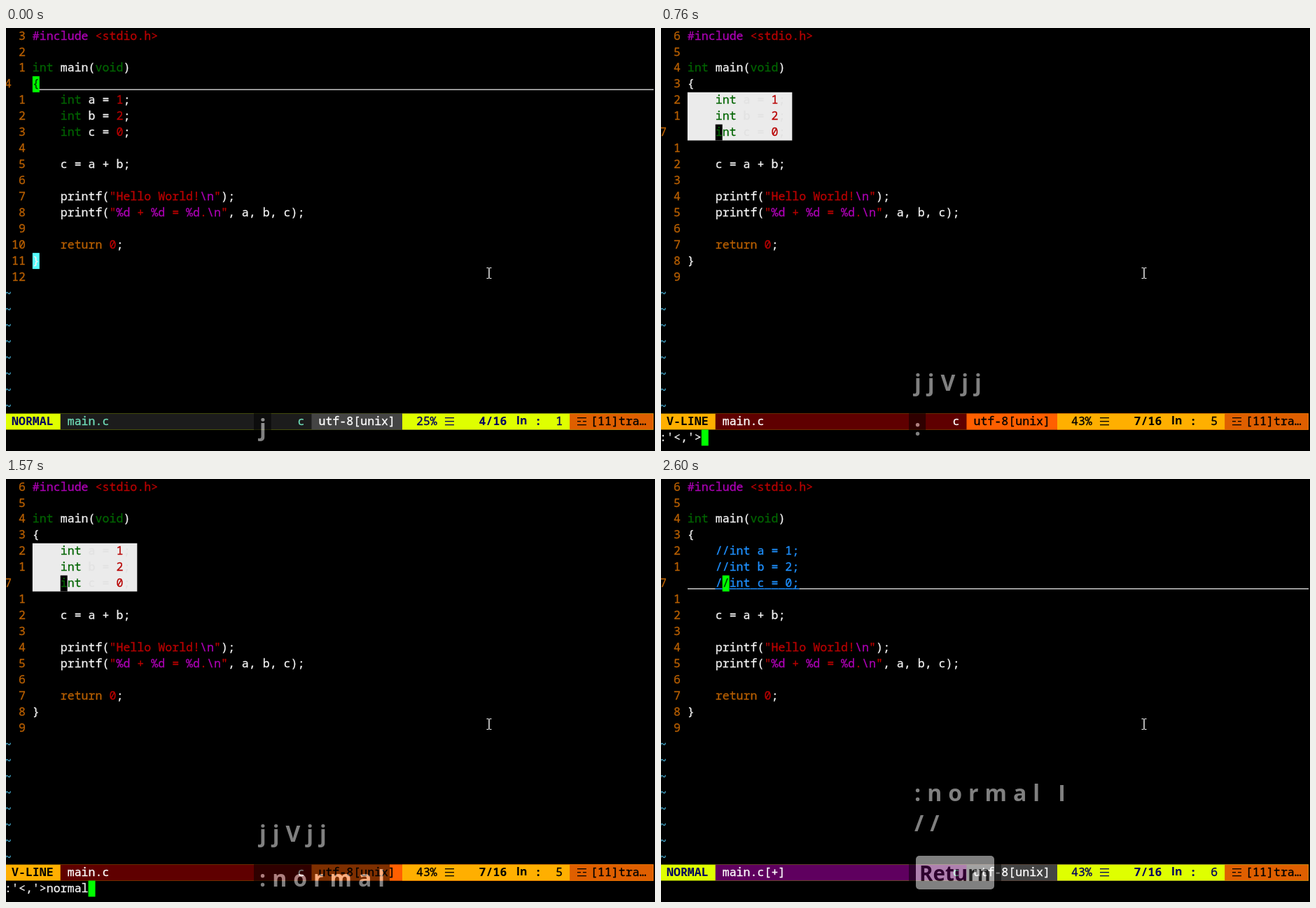
Animation, 927 px wide and 604 px high, one loop 4.07 s. Source, as an HTML page with a canvas:

```html
<!DOCTYPE html>
<html lang="en">
<head>
<meta charset="utf-8">
<title>Vim: comment out lines</title>
<style>
  html, body { margin: 0; width: 100%; height: 100%; overflow: hidden; background: #000; }
  canvas { position: absolute; left: 0; top: 0; }
  #keys { opacity: .5; }
</style>
</head>
<body>
<canvas id="screen" width="927" height="604"></canvas>
<canvas id="keys" width="927" height="604"></canvas>
<script>
const LOOP = 4070, RIGHT = 925;
const screen2d = document.getElementById('screen').getContext('2d');
const keys2d = document.getElementById('keys').getContext('2d');

// Text grid
const CELL = 9.965, ROW = 22.94, COLS = 93;
const colX = col => col * CELL - 2;
const rowY = row => row * ROW;

const COLORS = {
  w: '#f2f2f2', g: '#006400', r: '#b80000', p: '#ac00b4',
  o: '#b85f00', b: '#1e90ff', t: '#45a8cc'
};

// "^x" switches to colour x
const CODE = [
  '^p#include ^r<stdio.h>',
  '',
  '^gint ^wmain(^gvoid^w)',
  '{',
  '    ^gint^w a = ^r1^w;',
  '    ^gint^w b = ^r2^w;',
  '    ^gint^w c = ^r0^w;',
  '',
  '    c = a + b;',
  '',
  '    printf(^r"Hello World!^p\\n^r"^w);',
  '    printf(^r"^p%d^r + ^p%d^r = ^p%d^r.^p\\n^r"^w, a, b, c);',
  '',
  '    ^oreturn ^r0^w;',
  '}',
  ''
];
const FIRST = 4, LAST = 6;
const commented = CODE.map((line, i) =>
  i < FIRST || i > LAST ? line : '    ^b//' + line.trim().replace(/\^./g, ''));

const THEMES = {
  normal: { label: 'NORMAL', ink: '#00005f', main: '#dfff00', info: '#444444', infoInk: '#ffffff', bar: '#1c1c1c', barInk: '#6fdcb8' },
  visual: { label: 'V-LINE', ink: '#000000', main: '#ffaf00', info: '#ff5f00', infoInk: '#000000', bar: '#5f0000', barInk: '#ffffff' }
};
THEMES.done = { ...THEMES.normal, bar: '#5f005f', barInk: '#ffffff' };

// [start, cursor row, mode, command line, pressed keys]
const STEPS = [
  [0, 3, 'normal', '', ['j']],
  [170, 4, 'normal', '', ['jj']],
  [250, 4, 'normal', '', ['jjV']],
  [330, 4, 'visual', '', ['jjV']],
  [500, 5, 'visual', '', ['jjVj']],
  [670, 6, 'visual', '', ['jjVjj']]
];
const typed = (start, command, keys) =>
  STEPS.push([start, 6, 'visual', ":'<,'>" + command, ['jjVjj', ':' + keys]]);
[750, 830, 910, 1200, 1360, 1420, 1570, 1710].forEach((start, n) => {
  const word = 'normal '.slice(0, n);
  typed(start, word, word);
});
typed(1780, 'normal ', 'normal I');
typed(1860, 'normal I', 'normal I');
typed(1940, 'normal I/', 'normal I\n/');
typed(2110, 'normal I//', 'normal I\n//');
STEPS.push([2600, 6, 'done', '', [':normal I\n//', 'Return']]);

function box(color, x, y, w, h, ctx = screen2d) {
  ctx.fillStyle = color;
  ctx.fillRect(x, y, w, h);
}

function cells(color, col, row, cols = 1, rows = 1) {
  box(color, colX(col), rowY(row), cols * CELL, rows * ROW);
}

function put(text, col, row, color, bold) {
  screen2d.font = `${bold ? 'bold ' : ''}16.6px "Noto Sans Mono", "DejaVu Sans Mono", monospace`;
  screen2d.fillStyle = screen2d.strokeStyle = color;
  screen2d.lineWidth = .3;
  [...text].forEach((ch, i) => {
    if (ch === ' ') return;
    const at = [ch, colX(col + i), rowY(row) + 16.6];
    screen2d.fillText(...at);
    if (!bold) screen2d.strokeText(...at);
  });
}

function parse(line) {
  const chars = [];
  let color = 'w';
  for (let i = 0; i < line.length; i++) {
    if (line[i] === '^') color = line[++i];
    else chars.push([line[i], color]);
  }
  return chars;
}

function drawCode(cursorRow, mode, command) {
  const visual = mode === 'visual';
  const cursorCol = mode === 'done' ? 9 : cursorRow === 3 ? 4 : 8;
  if (visual) cells('#ebebeb', 4, FIRST, 15, cursorRow - FIRST + 1);
  (mode === 'done' ? commented : CODE).forEach((line, row) => {
    const here = row === cursorRow, underlined = here && !visual;
    const selected = visual && row >= FIRST && row <= cursorRow;
    const lineY = rowY(row) + 18.4;
    put(here ? String(row + 1) : String(Math.abs(row - cursorRow)).padStart(3), 0, row, COLORS.o);
    if (underlined) box('#d4d4d4', 38, lineY, RIGHT - 38, 1.4);
    if (cursorRow === 3 && row === 14) cells('#55ffff', 4, row);

    parse(line).forEach(([ch, key], i) => {
      const col = 4 + i;
      let color = COLORS[key];
      if (underlined && key !== 'w') {
        box('#000', colX(col), lineY - .5, CELL, 2.4);
        box(color, colX(col), lineY, CELL, 1.4);
      }
      if (selected && key === 'w') color = '#e2e2e2';
      if (here && col === cursorCol) {
        cells(command ? '#000' : '#00ff00', col, row);
        if (!command) color = '#003800';
      }
      put(ch, col, row, color);
    });
  });
  for (let row = 16; row < 24; row++) put('~', 0, row + .07, COLORS.t);
}

function trigram(x, color, broken) {
  [556, 561, 566].forEach((y, i) => {
    box(color, x, y, 13, 1.3);
    if (broken && i === 1) box('#df5f00', x + 5, y - 1, 3, 3);
  });
}

function drawStatus(cursorRow, mode) {
  const t = THEMES[mode], row = 24, line = cursorRow + 1;
  const column = mode === 'done' ? 6 : line === 4 ? 1 : 5;
  // Each section covers the rest of the bar, so no seams show
  [[t.main, 0], [t.bar, 8], [t.info, 44], [t.main, 57], ['#df5f00', 81]]
    .forEach(([color, col]) => cells(color, col, row, COLS - col));
  put(t.label, 1, row, t.ink, true);
  put(mode === 'done' ? 'main.c[+]' : 'main.c', 9, row, t.barInk);
  put('c', 42, row, mode === 'done' ? '#9cffd3' : t.barInk);
  put('utf-8[unix]', 45, row, t.infoInk);
  put(Math.floor(line / 16 * 100) + '%', 59, row, t.ink);
  trigram(627, t.ink);
  put(line + '/16', 68, row, t.ink, true);
  screen2d.font = 'bold 16px "Noto Sans", sans-serif';
  screen2d.fillText('ln', 729, 566);
  put(':', 76, row, t.ink, true);
  put(String(column), 79, row, t.ink);
  trigram(816, '#000', true);
  put('[11]tra…', 84, row, '#000');
}

function drawCommand(cursorRow, mode, command) {
  if (command) {
    put(command, 0, 25, COLORS.w);
    cells('#00ff00', command.length, 25);
  } else if (mode === 'visual') {
    put('-- VISUAL LINE --', 0, 25, COLORS.w, true);
    put(String(cursorRow - FIRST + 1), 82, 25, COLORS.w);
  }
}

function drawPointer() {
  box('#fff', 689.3, 343, 1.4, 14);
  for (const y of [342, 357]) {
    box('#fff', 686.5, y, 3, 1);
    box('#fff', 690.5, y, 3, 1);
  }
}

function drawReturn() {
  box('#000', 354, 530, 132, 74, keys2d);
  keys2d.fillStyle = '#fff';
  keys2d.beginPath();
  keys2d.roundRect(364, 538, 112, 48, 5);
  keys2d.fill();
  keys2d.font = 'bold 29.5px "Open Sans", "Noto Sans", sans-serif';
  keys2d.letterSpacing = '0px';
  keys2d.fillStyle = '#000';
  keys2d.fillText('Return', 369, 574);
}

// Paragraphs stack upwards from the bottom edge
function drawKeys(paragraphs) {
  keys2d.clearRect(0, 0, 927, 604);
  let y = 581.5;
  for (const text of [...paragraphs].reverse()) {
    if (text === 'Return') {
      drawReturn();
      y = 503;
      continue;
    }
    keys2d.font = 'bold 32px "Open Sans", "Noto Sans", sans-serif';
    keys2d.letterSpacing = '9px';
    const lines = text.split('\n');
    const top = y - 43 * (lines.length - 1);
    const width = Math.max(...lines.map(line => keys2d.measureText(line).width));
    box('#000', 354, top - 42, width + 6, y - top + 60, keys2d);
    keys2d.fillStyle = '#fff';
    lines.forEach((line, i) => keys2d.fillText(line, 362, top + 43 * i));
    y = top - 64;
  }
}

let shown;
function frame(now) {
  const time = now % LOOP;
  const step = STEPS.findLast(([start]) => start <= time);
  if (step !== shown) {
    shown = step;
    const [, row, mode, command, keys] = step;
    box('#000', 0, 0, 927, 604);
    drawCode(row, mode, command);
    drawStatus(row, mode);
    drawCommand(row, mode, command);
    drawPointer();
    drawKeys(keys);
  }
  requestAnimationFrame(frame);
}
frame(0);
</script>
</body>
</html>
```
